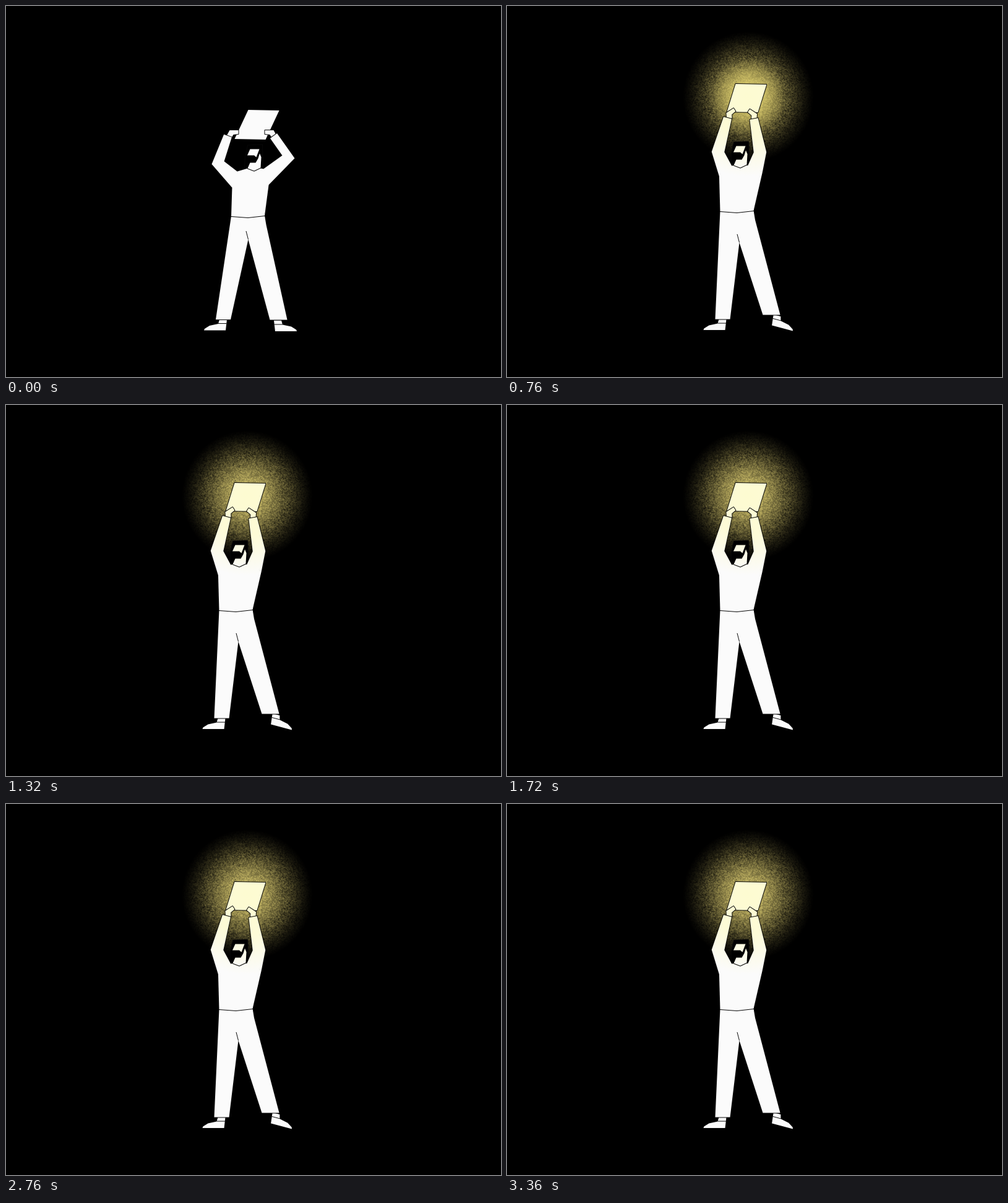
Animation of 800x600 px, one loop 3.4 s. Source, as an HTML page with a canvas:

```html
<!DOCTYPE html>
<html lang="en">
<head>
<meta charset="utf-8">
<title>Glowing page</title>
<style>
html, body { margin: 0; width: 100%; height: 100%; overflow: hidden; background: #000; }
canvas { display: block; width: 800px; height: 600px; }
</style>
</head>
<body>
<canvas id="stage" width="800" height="600"></canvas>
<script>
const ctx = document.getElementById('stage').getContext('2d');
const LOOP = 3400, STEP = 40, R = 110;

// Joint positions: lowered x, y, then raised x, y
const joints = {
  page:   [405, 191.5, 387, 148.5],
  neck:   [400.5, 262, 376.5, 257],
  waist:  [390.5, 339, 371, 331],
  crotch: [391, 377, 375, 382],
  cuffL:  [358, 209.5, 356, 180.5],
  elbowL: [342, 253, 340.5, 235.5],
  armL:   [374, 284, 354.5, 270],
  cuffR:  [432, 209.5, 398.5, 182],
  elbowR: [456, 243.5, 408.5, 236],
  armR:   [415.5, 279, 400, 264],
  hemL:   [350.5, 506.5, 348, 506],
  hemR:   [440, 507, 427, 499]
};

// Small shapes relative to their joint; hands and feet are mirrored for the right side
const hand = [[-4, 3], [-4, 0], [1, -9], [15, -9], [15, -3], [7, -2], [4, 3]];
const foot = [[-6, 0], [6, 0], [4, 17.5], [-31, 17.5], [-30, 15], [-22, 10], [-8, 7]];
const sock = [[-8, 6.5], [5.5, 6.5]];
const hair = [[-10, -37], [13, -38], [14, 0], [-15, 1], [-14, -19]];
const face = [[-6.5, -31], [8.5, -31], [3.5, -18], [0, -21], [-11, -21]];
const jaw = [[9, -24], [11.5, -18], [10.5, -1], [0, 4], [-10.5, 0], [-6.5, -9], [2.5, -9], [6.5, -16]];

const clamp = (v, a = 0, b = 1) => Math.min(b, Math.max(a, v));
const smooth = v => { v = clamp(v); return v * v * (3 - 2 * v); };
const lerp = (a, b, k) => a + (b - a) * k;
const add = ([x, y], dx, dy) => [x + dx, y + dy];

function place(shape, [x, y], angle = 0, side = 1) {
  const c = Math.cos(angle), s = Math.sin(angle);
  return shape.map(([u, v]) => [x + side * (u * c - v * s), y + u * s + v * c]);
}

// Widened polyline, used for sleeves
function taper(pts, widths) {
  const near = [], far = [];
  pts.forEach((p, i) => {
    const a = pts[Math.max(0, i - 1)], b = pts[Math.min(pts.length - 1, i + 1)];
    const dx = b[0] - a[0], dy = b[1] - a[1];
    const h = widths[i] / 2 / Math.hypot(dx, dy);
    near.push(add(p, -dy * h, dx * h));
    far.unshift(add(p, dy * h, -dx * h));
  });
  return [...near, ...far];
}

function makeGlow() {
  const c = document.createElement('canvas');
  c.width = c.height = R * 2;
  const g = c.getContext('2d'), img = g.createImageData(R * 2, R * 2);
  let seed = 71;
  const rand = () => (seed = seed * 16807 % 2147483647) / 2147483647;
  for (let i = 0; i < R * R * 4; i++) {
    const d = Math.hypot(i % (R * 2) - R, Math.floor(i / (R * 2)) - R);
    const m = 0.95 * Math.exp(-((d / 68) ** 2)) * clamp(1 - (d / 106) ** 6);
    const a = clamp(m + (rand() - 0.5) * 0.5 * Math.min(1, m * 3));
    img.data.set([205, 190, 105, a * 255], i * 4);
  }
  g.putImageData(img, 0, 0);
  return c;
}
const glow = makeGlow();

function drawGlow(x, y, level, flash) {
  ctx.globalAlpha = level;
  ctx.drawImage(glow, Math.round(x) - R, Math.round(y) - R);
  ctx.globalAlpha = 1;
  const g = ctx.createRadialGradient(x, y, 20, x, y, 62);
  g.addColorStop(0, `rgba(225,210,110,${0.6 * flash})`);
  g.addColorStop(1, 'rgba(210,195,95,0)');
  ctx.fillStyle = g;
  ctx.fillRect(x - R, y - R, R * 2, R * 2);
}

function trace(pts) {
  ctx.beginPath();
  pts.forEach(p => ctx.lineTo(...p));
}

// Dark edges go below all fills of a group, so that its parts merge
function shape(...group) {
  ctx.lineWidth = 2;
  for (const pts of group) { trace(pts); ctx.closePath(); ctx.stroke(); }
  for (const pts of group) { trace(pts); ctx.fill(); }
}

function line(pts) {
  ctx.lineWidth = 1;
  trace(pts);
  ctx.stroke();
}

function draw(t) {
  const k = smooth((t - 80) / 520);
  const level = smooth((t - 320) / 320);
  const flash = level * (1 - smooth((t - 760) / 360));
  const j = {};
  for (const [name, [x0, y0, x1, y1]] of Object.entries(joints))
    j[name] = [lerp(x0, x1, k), lerp(y0, y1, k)];

  ctx.setTransform(1, 0, 0, 1, 0, 0);
  ctx.fillStyle = '#000';
  ctx.fillRect(0, 0, 800, 600);
  ctx.translate(0.5, 0.5);

  const [x, y] = add(j.page, 2, -3);
  if (level) drawGlow(x, y, level, flash);

  const light = ctx.createRadialGradient(x, y, 0, x, y, 130);
  const tone = a => `rgb(${251 + 2 * a},251,${251 - 42 * a})`;
  light.addColorStop(0, tone(level));
  light.addColorStop(0.5, tone(level * 0.85));
  light.addColorStop(1, tone(0));
  ctx.strokeStyle = '#080808';
  ctx.lineJoin = 'round';

  const lean = lerp(11, 7, k), tall = lerp(24, 23, k);
  ctx.fillStyle = light;
  shape([add(j.page, lean - 25, -tall), add(j.page, lean + 25, 1 - tall),
         add(j.page, 25 - lean, tall), add(j.page, -25 - lean, tall - 1)]);

  ctx.fillStyle = '#000';
  shape(place(hair, j.neck));
  ctx.fillStyle = light;
  shape(place(face, j.neck));

  const step = (ankle, angle, side) => {
    shape(place(foot, ankle, angle, side));
    line(place(sock, ankle, angle, side));
  };
  step(j.hemL, 0, 1);
  step(add(j.hemR, lerp(-1.5, 9, k), 1), -0.26 * k, -1);

  const waistL = add(j.waist, -27, 0.5), waistR = add(j.waist, 27, -0.5);
  shape([waistL, waistR, add(waistR, 2.5, 15), add(j.hemR, 14, 0),
         add(j.hemR, -14, 0), j.crotch, add(j.hemL, 12, 0), add(j.hemL, -12, 0)]);
  line([add(j.crotch, -3.5, -13.5), j.crotch]);

  shape(place(hand, add(j.cuffL, 2, 0), -0.58 * k));
  shape(place(hand, add(j.cuffR, 1, 0), -0.58 * k, -1));

  const sleeve = [13.5, 20.5, 26];
  const left = taper([j.cuffL, j.elbowL, j.armL], sleeve);
  const right = taper([j.cuffR, j.elbowR, j.armR], sleeve);
  const torso = [add(j.neck, -27, 5), add(j.neck, -10, 0), add(j.neck, 10, 0),
                 add(j.neck, 15, 1), right[3], waistR, add(j.waist, 0, 2.5), waistL, left[2]];
  shape(torso, left, right);
  shape(place(jaw, j.neck));
}

const start = performance.now();
function frame() {
  const t = (performance.now() - start) % LOOP;
  draw(Math.floor(t / STEP) * STEP);
  requestAnimationFrame(frame);
}
frame();
</script>
</body>
</html>
```
